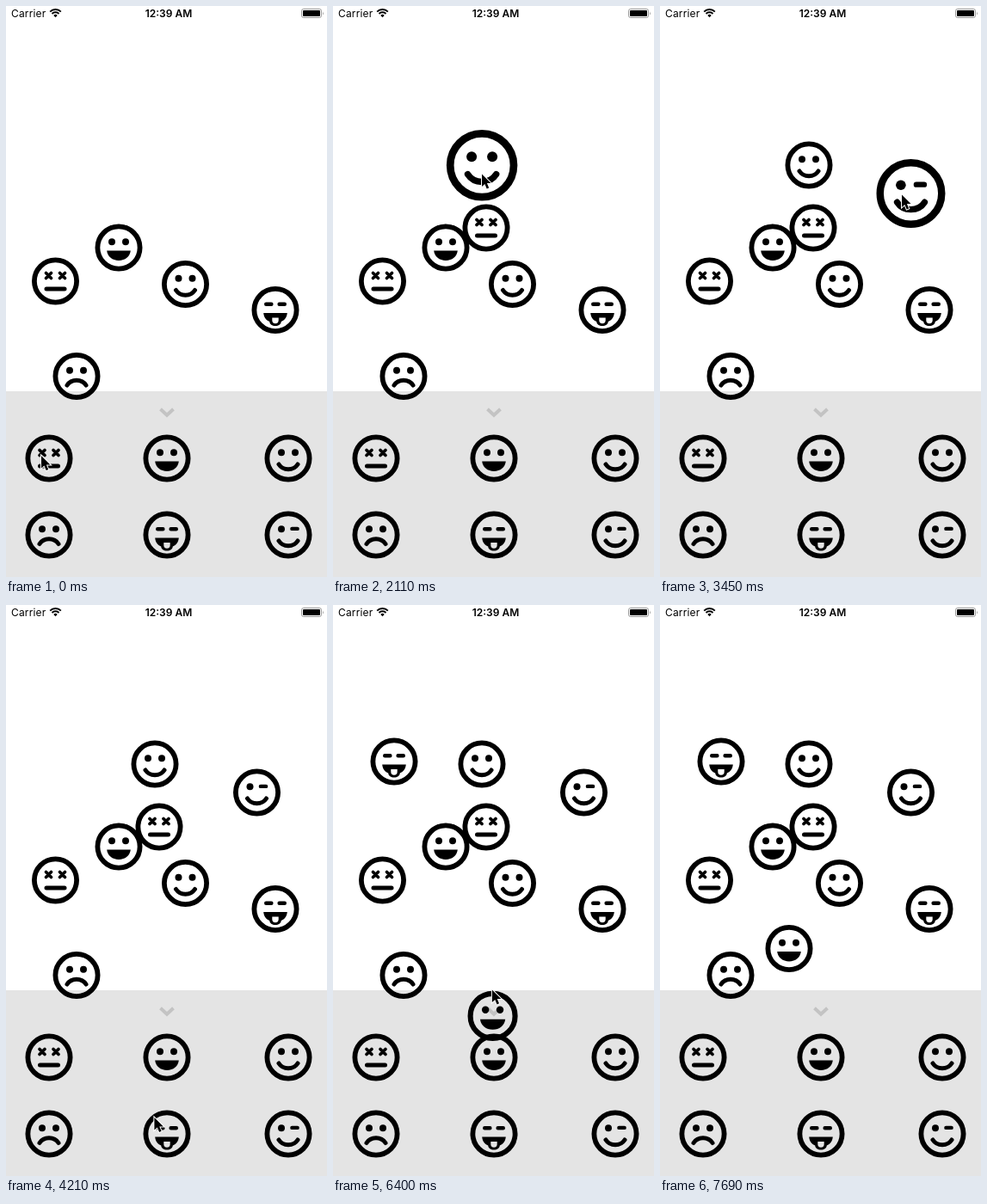
Write an HTML page that moves like this. It is 373 px wide and 664 px high and loops after 8.18 s.

```html
<!DOCTYPE html>
<html lang="en">
<head>
<meta charset="utf-8">
<title>Sticker drawer</title>
<style>
  html, body { margin: 0; width: 100%; height: 100%; overflow: hidden; background: #fff; }
  svg { display: block; width: 100%; height: 100%; }
  text { font: 12px Inter, Roboto, sans-serif; }
  .line { fill: none; stroke: #000; stroke-width: 5; stroke-linecap: round; stroke-linejoin: round; }
  .thin { stroke-width: 4.4; }
</style>
</head>
<body>
<svg viewBox="0 0 373 664">
  <defs>
    <circle id="ring" class="line" r="24.6" style="stroke-width:5.8"/>
    <g id="eyes"><circle cx="-8" cy="-6.7" r="4"/><circle cx="8" cy="-6.7" r="4"/></g>
    <path id="curve" class="line" d="M-11 7C-6 14.7 6 14.7 11 7"/>
    <g id="dead">
      <use href="#ring"/>
      <path class="line" style="stroke-width:3.7" d="M-11-9.5l6 6m0-6l-6 6M5-9.5l6 6m0-6l-6 6"/>
      <path class="line" d="M-10.5 9h21"/>
    </g>
    <g id="grin">
      <use href="#ring"/><use href="#eyes"/>
      <path d="M-13.8 3.6H13.8C13 10.6 7.4 15 0 15S-13 10.6-13.8 3.6Z"/>
    </g>
    <g id="smile"><use href="#ring"/><use href="#eyes"/><use href="#curve"/></g>
    <g id="sad">
      <use href="#ring"/><use href="#eyes"/>
      <path class="line" d="M-11 10.5C-6 2.8 6 2.8 11 10.5"/>
    </g>
    <g id="tongue">
      <use href="#ring"/>
      <path class="line thin" d="M-10.8-6.7h6.2M4.6-6.7h6.2"/>
      <path fill-rule="evenodd" d="M-13.8 3.6H13.8C13.3 8.6 10.8 12 6.8 13.6 6.4 16.8 3.8 18.6 0 18.6S-6.4 16.8-6.8 13.6C-10.8 12-13.3 8.6-13.8 3.6ZM-3.7 9V12A3.7 3.7 0 0 0 3.7 12V9Z"/>
    </g>
    <g id="wink">
      <use href="#ring"/><circle cx="-8" cy="-6.7" r="4"/>
      <path class="line thin" d="M4.4-7.1h6.2"/><use href="#curve"/>
    </g>
  </defs>

  <text x="6" y="12.5" letter-spacing=".15">Carrier</text>
  <g fill="none" stroke="#000" stroke-width="2">
    <path d="M51.2 6.6a9 9 0 0 1 12.6 0M53.5 9a5.7 5.7 0 0 1 8 0"/>
    <path d="M57.5 13.2l-2.2-2.3a3.2 3.2 0 0 1 4.4 0z" fill="#000" stroke="none"/>
  </g>
  <text x="189" y="12.5" text-anchor="middle" style="font-weight:600">12:39 AM</text>
  <rect x="343.5" y="3.5" width="23" height="10" rx="2.3" fill="none" stroke="#999"/>
  <rect x="345" y="5" width="20" height="7" rx="1"/>
  <path d="M368 6.5q1.6 2 0 4z" fill="#999"/>

  <rect y="448" width="373" height="216" fill="#e4e4e4"/>
  <path d="M179.5 468.7l7.5 7 7.5-7" fill="none" stroke="#c3c3c3" stroke-width="4"/>
  <g id="faces"></g>
  <path id="cursor" d="M0 0V14.6L3.4 11.5 5.7 17 8.2 15.9 5.9 10.6H10.5Z" stroke="#fff" stroke-width="2" paint-order="stroke"/>
</svg>
<script>
const LOOP = 8180, PAUSE = 150, LAG = 15, GROW_TIME = 250, GROWTH = 0.5;
const layer = document.getElementById('faces');
const cursor = document.getElementById('cursor');

function addFace(kind, x = 0, y = 0) {
  const face = document.createElementNS('http://www.w3.org/2000/svg', 'use');
  face.setAttribute('href', '#' + kind);
  face.setAttribute('transform', `translate(${x} ${y})`);
  return layer.appendChild(face);
}

// The drawer is a grid of three columns and two rows
const homes = {};
['dead', 'grin', 'smile', 'sad', 'tongue', 'wink'].forEach((kind, i) => {
  homes[kind] = [[50, 187, 328][i % 3], 526 + 89 * Math.floor(i / 3)];
  addFace(kind, ...homes[kind]);
});

addFace('dead', 57.5, 320);
addFace('grin', 131, 281);
addFace('smile', 208.5, 323.5);
addFace('tongue', 313, 353.5);
addFace('sad', 82, 430.5);

// grab: where the pointer holds the face; stops: [time, x, y] on the way;
// then: the point the pointer passes after letting go
const drags = [
  { kind: 'dead', grab: [-9, -3], start: 690, drop: 1060, to: [178, 258], then: [1420, 280, 528] },
  { kind: 'smile', grab: [0, 7], start: 1780, drop: 2130, to: [173, 185], then: [2570, 352, 620] },
  { kind: 'wink', grab: [-7, 1], start: 3010, drop: 3380, to: [291.5, 218], then: [3780, 132, 460] },
  { kind: 'tongue', grab: [-14, -17], start: 4440, drop: 5270, to: [71, 182], then: [5880, 93, 593],
    stops: [[4860, 173.5, 239.5], [5070, 173.5, 239.5]] },
  { kind: 'grin', grab: [0, -5], start: 6325, drop: 7035, to: [150, 399.5], then: [7690, 338, 668],
    stops: [[6480, 184, 424]] }
];

const travel = [];
for (const d of drags) {
  const home = homes[d.kind];
  d.face = addFace(d.kind);
  d.path = [[d.start, ...home], ...(d.stops || []), [d.drop, ...d.to]];
  travel.push([d.start - PAUSE, ...add(home, d.grab, 1)],
              [d.drop + PAUSE, ...add(d.to, d.grab, 1 + GROWTH)], d.then);
}

function add(point, offset, scale) {
  return point.map((v, i) => v + offset[i] * scale);
}

function ease(p) {
  p = Math.min(1, Math.max(0, p));
  return p < 0.5 ? 4 * p ** 3 : 1 - 4 * (1 - p) ** 3;
}

function position(keys, t) {
  const next = keys.findIndex(k => k[0] > t);
  if (next < 1) return keys.at(next).slice(1);
  const [t0, ...a] = keys[next - 1], [t1, ...b] = keys[next];
  const p = ease((t - t0) / (t1 - t0));
  return a.map((v, i) => v + (b[i] - v) * p);
}

const growth = (t, from) => GROWTH * ease((t - from) / GROW_TIME);

function pointerAt(t) {
  const d = drags.find(d => t >= d.start - PAUSE && t <= d.drop + PAUSE);
  if (!d) return position(travel, t);
  return add(position(d.path, t + LAG), d.grab, 1 + growth(t, d.start));
}

function draw() {
  const t = performance.now() % LOOP;
  for (const { face, path, start, drop } of drags) {
    const scale = 1 + growth(t, start) - growth(t, drop);
    face.setAttribute('visibility', t < start ? 'hidden' : 'visible');
    face.setAttribute('transform', `translate(${position(path, t)}) scale(${scale})`);
  }
  cursor.setAttribute('transform', `translate(${pointerAt(t)})`);
  requestAnimationFrame(draw);
}
draw();
</script>
</body>
</html>
```
